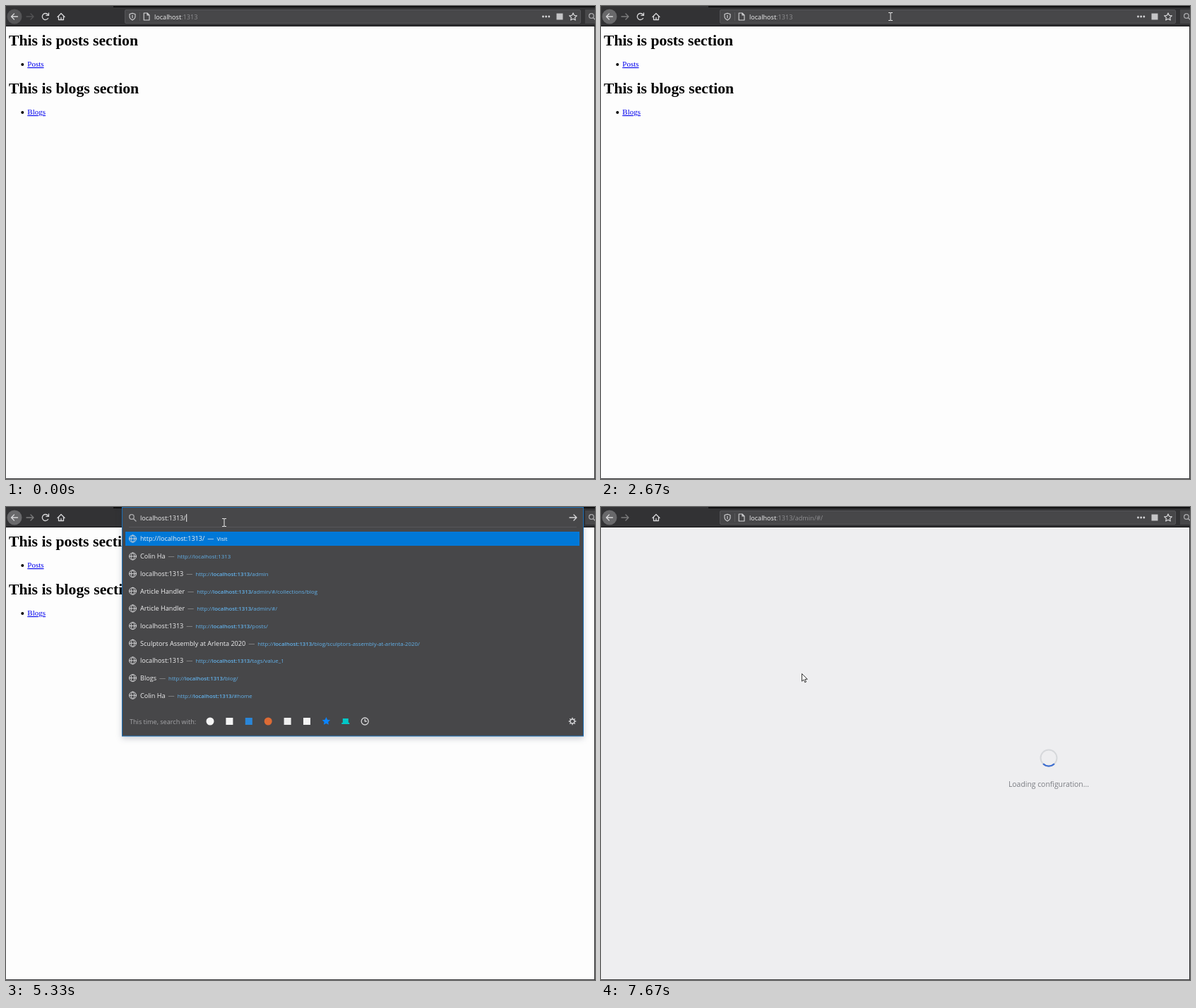
An HTML page that plays this animation: 834 by 671 pixels, repeating every 8000 ms.

```html
<!DOCTYPE html>
<html lang="en">
<head>
<meta charset="utf-8">
<title>Local site</title>
<style>
  html, body { margin: 0; width: 100%; height: 100%; overflow: hidden; background: #fdfdfd; }
  svg { display: block; width: 834px; height: 671px; }
  text { font: 9.1px "Open Sans", "Noto Sans", sans-serif; fill: #f0f0f1; white-space: pre; }
  .head { font: bold 21.74px "Liberation Serif", "Noto Serif", serif; fill: #000; }
  .link { font: 11px "Liberation Serif", "Noto Serif", serif; fill: #0000ee; text-decoration: underline; }
  .load { font-size: 10.4px; fill: #7b7d83; text-anchor: middle; }
  .dash { fill: #9a9a9c; }
  .addr { font-size: 7.8px; fill: #62b1ea; }
  .addr .hit { font-weight: 600; }
  .visit { font-size: 7.8px; }
  .faint { fill: #8f8f92; }
  .note { fill: #a5a5a8; }
  .line { fill: none; stroke: #d6d6d8; stroke-width: 1.3; stroke-linecap: round; stroke-linejoin: round; }
  .menu { filter: drop-shadow(0 3px 4px rgba(20, 30, 60, .2)); }
</style>
</head>
<body>
<svg id="stage" viewBox="0 0 834 671" xmlns="http://www.w3.org/2000/svg"></svg>
<script>
const LOOP = 8000;
const HOST = 'localhost:1313';
const stage = document.getElementById('stage');

const rect = (x, y, w, h, fill, extra = '') =>
  `<rect x="${x}" y="${y}" width="${w}" height="${h}" fill="${fill}" ${extra}/>`;
const disc = (x, y, r, fill) => `<circle cx="${x}" cy="${y}" r="${r}" fill="${fill}"/>`;
const text = (x, y, s, cls = '', extra = '') => `<text x="${x}" y="${y}" class="${cls}" ${extra}>${s}</text>`;
const line = (d, extra = '') => `<path class="line" d="${d}" ${extra}/>`;
const at = (x, y, body, extra = '') => `<g transform="translate(${x} ${y})" ${extra}>${body}</g>`;
const square = color => rect(-5, -5, 10, 10, color);
const dot = color => disc(0, 0, 5.5, color);

function starPath(r) {
  const pts = Array.from({ length: 10 }, (_, i) => {
    const a = i * Math.PI / 5 - Math.PI / 2, q = i % 2 ? r * .48 : r;
    return `${(q * Math.cos(a)).toFixed(2)} ${(q * Math.sin(a)).toFixed(2)}`;
  });
  return `M${pts.join('L')}Z`;
}

function gear() {
  let teeth = '';
  for (let i = 0; i < 8; i++) teeth += line('M0 -3.2V-4.8', `transform="rotate(${i * 45})"`);
  return line('M3 0A3 3 0 1 1 -3 0A3 3 0 1 1 3 0') + teeth;
}

const icon = {
  globe: line('M5 0A5 5 0 1 1 -5 0A5 5 0 1 1 5 0M-5 0H5M0 -5C-3.2 -2.5 -3.2 2.5 0 5C3.2 2.5 3.2 -2.5 0 -5', 'style="stroke-width:1"'),
  back: line('M4.5 0H-4.5M-.5 -4L-4.5 0L-.5 4'),
  forward: line('M-5 0H5M1 -4L5 0L1 4'),
  reload: line('M3.6 2.5A4.5 4.5 0 1 1 3.4 -2.8M4.5 -5V-1.6H1'),
  stop: line('M-4 -4L4 4M4 -4L-4 4'),
  home: line('M-5 .5L0 -4.5L5 .5M-3.5 -.5V4.5H3.5V-.5M0 4V1.5'),
  shield: line('M0 -4.8L4 -3.5V0C4 2.5 2 4 0 5C-2 4 -4 2.5 -4 0V-3.5ZM0 -2V2', 'style="stroke-width:1.1"'),
  doc: line('M-3.8 -5H1L4 -2V5H-3.8ZM1 -5V-2H4', 'style="stroke-width:1.1"'),
  lens: line('M2.2 -1A3.3 3.3 0 1 1 -4.4 -1A3.3 3.3 0 1 1 2.2 -1M1.4 1.5L5 5'),
  star: line(starPath(5.6), 'style="stroke-width:1.2"'),
  clock: line('M5 0A5 5 0 1 1 -5 0A5 5 0 1 1 5 0M0 -2.8V0H2.2'),
  gear: gear()
};

const engines = [
  dot('#f4f4f4'), square('#f4f4f4'), square('#2a86d8'), dot('#dd6b35'),
  square('#eeeeee'), square('#f4f4f4'),
  `<path d="${starPath(6)}" fill="#0a84ff"/>`,
  '<path d="M-4 -4H4V2H5.5V4H-5.5V2H-4Z" fill="#00c8c8"/>',
  icon.clock
];

const ME = 'Colin Ha', CMS = 'Article Handler';
const local = path => 'http://' + HOST + path;
const admin = path => [CMS, local('/admin/#/' + path)];

const lists = {
  sites: [
    ['Search with Finoro', '', dot('#f4f4f4')],
    [ME, local('')],
    ['Ashcombe Dictionary of Intermediate English | AXDIE', 'axdieonline.com', square('#1c1c5c')],
    ['Finoro Interpret', 'interpret.finoro.com', square('#4c86e4')],
    ['ClipFen', 'clipfen.com', square('#f00000')],
    [ME, 'colinha.dev', square('#7f9694')],
    ['RepLot', 'replot.com', dot('#f4f4f4')],
    ['Synonyms and Text Helps | TermOtter', 'termotter.com', square('#50483c')]
  ],
  root: [
    [ME, local('')],
    [HOST, local('/admin')],
    admin('collections/blog'),
    admin(''),
    [HOST, local('/posts/')],
    ['Sculptors Assembly at Arlenta 2020', local('/blog/sculptors-assembly-at-arlenta-2020/')],
    [HOST, local('/tags/value_1')],
    ['Blogs', local('/blog/')],
    [ME, local('/#home')]
  ],
  admin: [
    [HOST, local('/admin')],
    ...['blog', '', 'config', 'post', 'contact', 'blog/entries/2021-03-02_redux-for-react', 'social', 'home']
      .map(p => admin(p && 'collections/' + p))
  ]
};

// Each step changes part of the state and holds until the next one.
const beam = (x, y) => ['beam', x, y], arrow = (x, y) => ['arrow', x, y];
const steps = [
  [0, { page: 'posts', path: '', dim: true, load: 'reload' }],
  [330, { dim: false }],
  [1330, { cursor: beam(410, 15) }],
  [1670, { focus: true, list: 'sites', mark: 'all' }],
  [2330, { focus: false, list: '', mark: '' }],
  [3000, { cursor: arrow(164, 162) }],
  [3330, { cursor: arrow(98, 116) }],
  [3670, { cursor: beam(270, 15) }],
  [4000, { focus: true, mark: 'all', cursor: beam(308, 21) }],
  [4330, { list: 'sites', mark: 'caret', cursor: ['click', 308, 21] }],
  [4670, { cursor: beam(309, 22) }],
  [5330, { list: 'root', typed: '/' }],
  [6000, { list: 'admin', typed: '/ad' }],
  [6330, { typed: '/admin' }],
  [7000, { page: 'blank', focus: false, list: '', typed: '', mark: '', path: '/admin', load: 'stop' }],
  [7330, { path: '/admin/', load: '' }],
  [7670, { page: 'loading', path: '/admin/#/', cursor: arrow(284, 236) }]
];

const section = (name, y) =>
  text(4, y, `This is ${name.toLowerCase()} section`, 'head') +
  disc(23.3, y + 27, 2, '#000') + text(30.3, y + 30, name, 'link');

const pages = {
  posts: rect(0, 29, 834, 642, '#fdfdfd') + section('Posts', 56) + section('Blogs', 124),
  blank: rect(0, 29, 834, 642, '#fdfdfd'),
  loading: rect(0, 29, 834, 642, '#eeeef0') +
    '<circle cx="634" cy="356" r="11.5" fill="none" stroke="#d6d8db" stroke-width="2"/>' +
    '<path d="M626 364.3A11.5 11.5 0 0 0 642 364.3" fill="none" stroke="#3f6fd0" stroke-width="2.2"/>' +
    text(634, 397, 'Loading configuration...', 'load')
};

function toolbar(s) {
  return rect(0, 0, 834, 29, '#323234') + rect(152, 0, 682, 2, '#101011') + rect(0, 28, 834, 1, '#111112') +
    disc(12, 15, 10.5, s.dim ? '#555557' : '#69696b') + at(12, 15, icon.back) +
    at(34, 15, icon.forward, `opacity="${s.dim ? .2 : .45}"`) +
    (s.load ? at(56, 15, icon[s.load]) : '') + at(78, 15, icon.home) +
    rect(820, 5, 20, 20, '#474749') + at(830, 15, icon.lens, 'opacity=".7"') +
    (s.focus ? '' : rect(168.5, 5.5, 645, 19, '#474749', 'rx="1.5" stroke="#555558"'));
}

function address(s) {
  if (s.typed) {
    return at(179, 15, icon.lens, 'opacity=".7"') + at(803, 15, icon.forward) +
      text(190, 19, HOST + s.typed, '', 'id="entry"');
  }
  const tools = at(179, 15, icon.shield) + rect(189, 9, 1, 12, '#5a5a5d') + at(199, 15, icon.doc) +
    [760.5, 764.7, 768.9].map(x => disc(x, 15, 1.4, '#d6d6d8')).join('') +
    rect(779.5, 10.5, 9, 9, '#c4c4c6') + at(803, 15.5, icon.star);
  const value = s.focus ? HOST
    : `localhost<tspan class="faint">:1313${s.path}</tspan>`;
  return tools + text(210, 19, value, '', 'id="entry"');
}

function row([title, url, mark], i, hit) {
  const y = 70 + (i - 1) * 24.65;
  const shown = hit ? url.replace(hit, `<tspan class="hit">${hit}</tspan>`) : url;
  const tail = url ? `<tspan dx="4" class="dash">—</tspan><tspan dx="4" class="addr">${shown}</tspan>` : '';
  return at(179.5, y, mark || icon.globe) + text(190, y + 3.4, title + tail);
}

function menu(s) {
  const rows = lists[s.list] || [];
  const bottom = !s.list ? 30 : s.typed ? 325 : 276;
  let out = rect(164.5, .5, 653, bottom - .5, '#474749', 'class="menu" stroke="#1c6eb4"');
  if (!s.list) return out;
  out += rect(174, 28, 634, 1, '#57575a');
  if (s.typed) {
    out += rect(169, 35, 643, 20, '#0078d7') + at(179.5, 45, icon.globe) +
      text(190, 48.4, `${local(s.typed)}<tspan dx="4">—</tspan><tspan dx="4" class="visit">Visit</tspan>`);
  }
  const hit = s.typed && HOST + s.typed;
  out += rows.map((r, i) => row(r, s.typed ? i + 1 : i, hit)).join('');
  const y = bottom - 21;
  return out + text(175, y + 3.6, 'This time, search with:', 'note') +
    engines.map((e, i) => at(289 + i * 27.4, y, e)).join('') + at(802, y, icon.gear);
}

function pointer(cursor) {
  if (!cursor) return '';
  const [kind, x, y] = cursor;
  const shapes = {
    beam: line('M-2.5 -5.5H-.7L0 -5L.7 -5.5H2.5M0 -5V5M-2.5 5.5H-.7L0 5L.7 5.5H2.5', 'style="stroke:#eee;stroke-width:1"'),
    arrow: '<path d="M.5 .5V11.2L3 8.9L4.8 12.8L6.5 12L4.8 8.3H8.2Z" fill="#fff" stroke="#222" stroke-width=".9"/>',
    click: disc(0, 0, 20.5, '#ffe733')
  };
  return at(x, y, shapes[kind]);
}

function markEntry(s) {
  const entry = document.getElementById('entry');
  const x = +entry.getAttribute('x'), w = entry.getComputedTextLength();
  if (s.mark === 'all') {
    entry.insertAdjacentHTML('beforebegin', rect(x - .5, 9, w + 1, 13, '#e4eefa'));
    entry.style.fill = '#3a7fc2';
  } else if (s.mark === 'caret') {
    entry.insertAdjacentHTML('afterend', rect(x + w + .5, 10, 1, 11, '#f0f0f1'));
  }
}

function draw(n) {
  const s = Object.assign({}, ...steps.slice(0, n + 1).map(step => step[1]));
  stage.innerHTML = pages[s.page] + rect(833, 29, 1, 642, '#2a2a2c') + rect(0, 670, 834, 1, '#3a3a3c') +
    toolbar(s) + (s.focus ? menu(s) : '') + address(s) + pointer(s.cursor);
  markEntry(s);
}

let shown = -1;
function tick() {
  const t = performance.now() % LOOP;
  const n = steps.filter(step => step[0] <= t).length - 1;
  if (n !== shown) draw(shown = n);
  requestAnimationFrame(tick);
}
tick();
</script>
</body>
</html>
```
